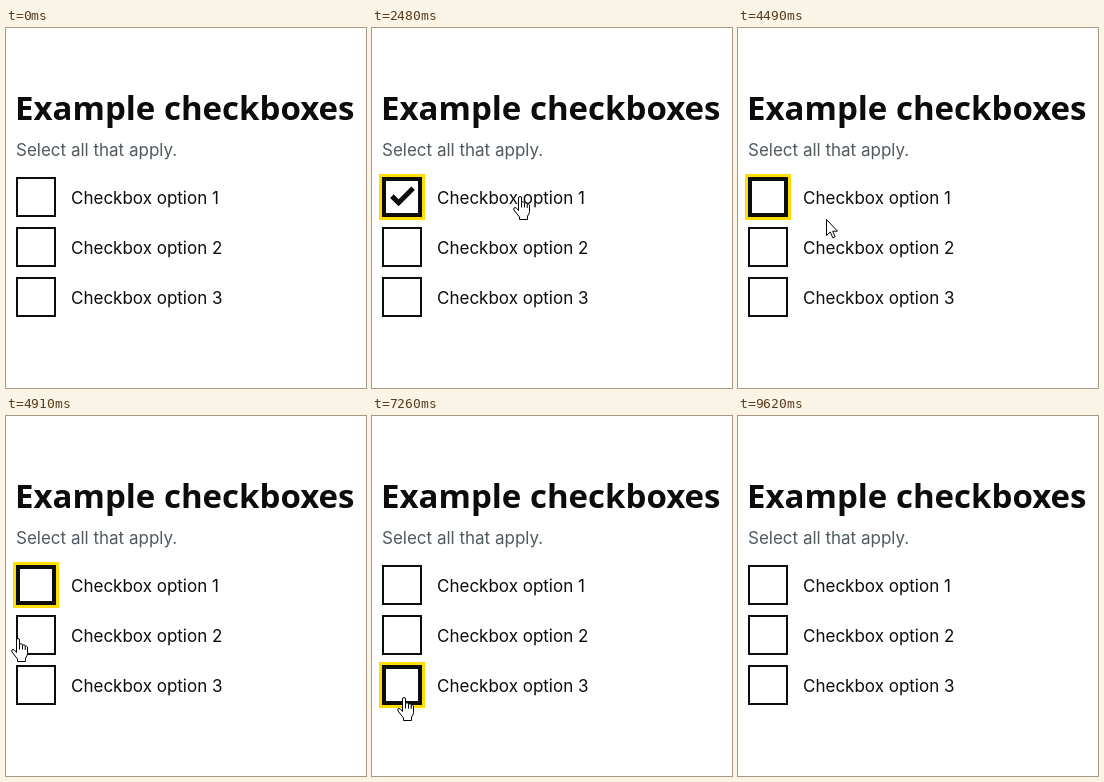
Write an HTML page that moves like this. It is 360 px wide and 360 px high and loops after 9720 ms.

```html
<!DOCTYPE html>
<html lang="en">
<head>
<meta charset="utf-8">
<title>Example checkboxes</title>
<style>
  html, body { margin: 0; width: 100%; height: 100%; overflow: hidden; background: #fff; }
  svg { display: block; width: 100vw; height: 100vh; }
  text { font: 17px Inter, "Liberation Sans", sans-serif; fill: #0b0c0c; }
  .title { font: 700 33px "Noto Sans", "Open Sans", sans-serif; }
  .hint { fill: #505a5f; }
  .edge { fill: #fff; stroke: #0b0c0c; }
  .ring { fill: #fd0; }
  .tick { fill: #0b0c0c; }
  .cursor path { fill: #fff; stroke: #000; stroke-linejoin: round; }
  .cursor .seam { fill: none; }
</style>
</head>
<body>
<svg id="stage" viewBox="0 0 360 360">
  <text class="title" x="9" y="92">Example checkboxes</text>
  <text class="hint" x="10" y="128">Select all that apply.</text>
  <g id="rows"></g>
  <g id="arrow" class="cursor">
    <path d="M1.5 .5v16l3.8-3.5l2.5 5.8l2.4-1.1l-2.5-5.5h4.8z"/>
  </g>
  <g id="hand" class="cursor">
    <path d="M-.5 14.5V2Q-.5 .5 1 .5T2.5 2V6.5Q4 4.8 5.5 6.5V7.5Q7 5.8 8.2 7.5V8.5Q9.5 7.3 10.5 9V15.5Q10.5 18 8.5 20V23.5H.5V21L-5 14Q-6 11.5 -4 11.5Q-2.5 11.5 -.5 14.5Z"/>
    <path class="seam" d="M2.5 6.5V11.5M5.5 7.5V11.5M8.2 8.5V12"/>
  </g>
</svg>
<script>
const LOOP = 9720, STEP = 45;
const ENTER = 1430, EXIT = 8510, BLUR = 9620;
const BOX = 40, PITCH = 50, LEFT = 10, TOP = 149;

const glide = u => u * u * (3 - 2 * u);
const settle = u => 1 - (1 - u) ** 3.2;

// The pointer's stops, each reached from the one before
const moves = [
  { start: ENTER, end: 1890, to: [147, 168], ease: settle },
  { start: 4310, end: 4760, to: [8, 222] },
  { start: 4910, end: 5060, to: [27, 219] },
  { start: 6670, end: 6840, to: [35, 288] },
  { start: 6990, end: 7110, to: [31, 281] },
  { start: 7500, end: 7860, to: [136, 274] },
  { start: 8390, end: EXIT, to: [139, 314] }
];

// Mouse button down and up
const clicks = [
  [2390, 2480], [3850, 3940], [5530, 5590],
  [6490, 6580], [7200, 7320], [8080, 8200]
];

function pointerAt(t) {
  let pos = [171, 383];
  for (const { start, end, to, ease = glide } of moves) {
    if (t < start) break;
    const n = Math.round((end - start) / STEP);
    const pose = Math.floor(n * (t - start) / (end - start)) + 1;
    const p = ease(Math.min(1, pose / (n + 1)));
    pos = pos.map((v, i) => v + (to[i] - v) * p);
  }
  return pos.map(Math.round);
}

// The control under a point: its row, and whether it is the box or the label
function hit([x, y]) {
  const row = Math.floor((y - TOP + 2) / PITCH);
  const dy = y - TOP - row * PITCH;
  if (row < 0 || row > 2) return null;
  if (Math.abs(x - LEFT - BOX / 2) <= 22 && dy <= BOX + 2) return { row, box: true };
  if (x >= 65 && x <= 234 && dy >= 0 && dy < 36) return { row, box: false };
  return null;
}

// Pressing a box focuses it, pressing a label blurs; release toggles and focuses
function formAt(t) {
  const checked = [false, false, false];
  let focus = -1;
  for (const [down, up] of clicks) {
    if (t < down) break;
    const { row, box } = hit(pointerAt(down));
    focus = box || t >= up ? row : -1;
    if (t >= up) checked[row] = !checked[row];
  }
  return { checked, focus: t < BLUR ? focus : -1 };
}

const $ = id => document.getElementById(id);
const show = (el, on) => el.setAttribute('visibility', on ? 'visible' : 'hidden');

function set(el, attrs) {
  for (const key in attrs) el.setAttribute(key, attrs[key]);
  return el;
}

function add(parent, tag, attrs) {
  const el = document.createElementNS('http://www.w3.org/2000/svg', tag);
  return parent.appendChild(set(el, attrs));
}

function makeRow(_, i) {
  const g = add($('rows'), 'g', { transform: `translate(${LEFT} ${TOP + PITCH * i})` });
  const ring = add(g, 'rect', { class: 'ring', x: -3, y: -3, width: BOX + 6, height: BOX + 6 });
  const edge = add(g, 'rect', { class: 'edge' });
  const tick = add(g, 'path', {
    class: 'tick',
    d: 'M-11.5 -6h5v7h18v5h-23z',
    transform: 'translate(20.5 17) rotate(-45)'
  });
  add(g, 'text', { x: 55, y: 27 }).textContent = `Checkbox option ${i + 1}`;
  return { ring, edge, tick };
}

const rows = Array.from({ length: 3 }, makeRow);

function draw(t) {
  const { checked, focus } = formAt(t);
  rows.forEach(({ ring, edge, tick }, i) => {
    const line = focus === i ? 4 : 2;
    const side = BOX - line;
    set(edge, { x: line / 2, y: line / 2, width: side, height: side, 'stroke-width': line });
    show(ring, focus === i);
    show(tick, checked[i]);
  });

  const pos = pointerAt(t);
  const active = hit(pos) ? 'hand' : 'arrow';
  for (const id of ['arrow', 'hand']) {
    set($(id), { transform: `translate(${pos})` });
    show($(id), t >= ENTER && t < EXIT && id === active);
  }
}

const began = performance.now();
function frame() {
  draw((performance.now() - began) % LOOP);
  requestAnimationFrame(frame);
}
frame();
</script>
</body>
</html>
```
